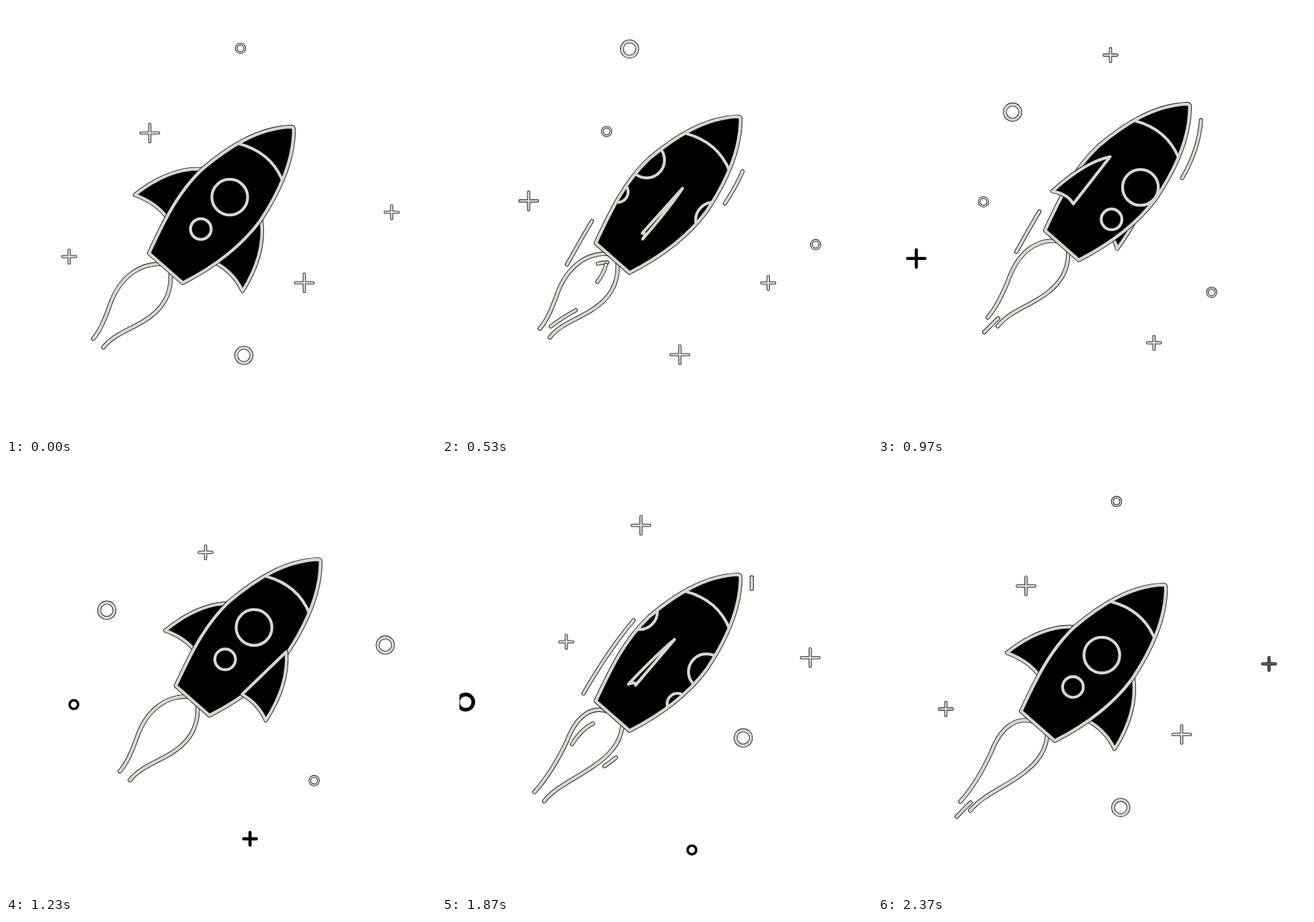
An HTML page for the animation above (2.4 s loop, 640 by 640 pixels).

```html
<!DOCTYPE html>
<html lang="en">
<head>
<meta charset="utf-8">
<title>Rocket</title>
<style>
html, body { margin: 0; width: 100%; height: 100%; overflow: hidden; background: #fff; }
svg { display: block; width: 100%; height: 100%; }
path, circle { fill: none; stroke-linecap: round; stroke-linejoin: round; }
</style>
</head>
<body>
<svg viewBox="0 0 640 640">
  <defs>
    <clipPath id="sky"><rect x="26" y="10" width="589" height="620"/></clipPath>
    <clipPath id="hull"><path id="hullShape"/></clipPath>
  </defs>
  <g id="stars" clip-path="url(#sky)"></g>
  <g id="rocket"></g>
</svg>
<script>
const LOOP = 2400, HALF = LOOP / 2, STEP = 40;
const INK = '#000', GREY = '#d8d7cf';
const BODY = 'M424 180C375 182 331 210 292 243C257 276 236 318 213 368L263 412' +
  'C308 389 350 358 378 320C404 281 428 232 428 184Q428 180 424 180Z';

const $ = id => document.getElementById(id);
const clamp = v => Math.max(0, Math.min(1, v));

function set(el, attrs) {
  for (const k in attrs) el.setAttribute(k, attrs[k]);
}
function add(parent, tag, attrs = {}) {
  const el = document.createElementNS('http://www.w3.org/2000/svg', tag);
  set(el, attrs);
  return parent.appendChild(el);
}
function show(el, on) {
  el.style.display = on ? '' : 'none';
  return on;
}

// A grey line with a thin dark rim: two strokes of the same shape.
function rimmed(parent, tag, attrs, width, fill = 'none') {
  const g = add(parent, 'g');
  const back = add(g, tag, { ...attrs, stroke: INK, 'stroke-width': width + 1.7, style: 'fill:' + fill });
  const front = add(g, tag, { ...attrs, stroke: GREY, 'stroke-width': width });
  return { g, front, set: a => { set(back, a); set(front, a); } };
}

// ---- Stars drift down-left, entering at the top or right edge of the sky.
const SLOPE = 1.19;
const ring = r => rimmed($('stars'), 'circle', { r }, r > 8 ? 3.7 : 2);
const plus = r => rimmed($('stars'), 'path', { d: `M${-r} 0H${r}M0 ${-r}V${r}` }, 2.9);

// x and y at time 0, time of leaving, speed (px/ms) before and after time 0
function star(mark, x, y, end, before, after = before) {
  const birth = Math.max((x - 615) / before, (10 - y) / before / SLOPE);
  return t => {
    if (t >= end) t -= LOOP;
    if (!show(mark.g, t > birth + 50)) return;
    const d = t * (t < 0 ? before : after);
    const light = clamp(Math.min((t - birth - 140) / 60, (end - 400 - t) / 40));
    set(mark.g, { transform: `translate(${x - d} ${y + SLOPE * d})` });
    set(mark.front, { stroke: `rgb(${216 * light},${215 * light},${207 * light})` });
  };
}
const stars = [
  star(ring(6.4), 349, 63, 1600, .15, .2),
  star(ring(6.4), 626.5, 271.5, 2210, .1354),
  star(ring(11.4), 372.5, -47, 1885, .1794),
  star(ring(11.4), 354, 520, 450, .1815, .2),
  star(plus(13), 214, 189, 1150, .158, .1635),
  star(plus(9.5), 94, 373, 450, .175, .1625),
  star(plus(13), 444, 412, 960, .2, .173),
  star(plus(9.5), 574, 307, 1570, .2, .17)
];

// ---- Rocket layers, back to front
const rocket = $('rocket');
set($('hullShape'), { d: BODY });

// Flame edge: seven curve points; a wave of the given size runs along them.
function flame(points, size, crest) {
  const line = rimmed(rocket, 'path', {}, 4.6);
  return sway => {
    const v = points.map(([x, y], i) => {
      const w = sway * size * Math.cos((i - crest) * .62);
      return `${x + w} ${y - w}`;
    });
    line.set({ d: `M${v[0]}C${v.slice(1)}` });
  };
}
const flames = [
  flame([[232, 384], [197, 383], [170, 405], [156, 441], [148, 464], [141, 482], [130, 495]], 15, 2.5),
  flame([[245, 396], [247, 430], [233, 452], [205, 469], [182, 483], [160, 489], [145, 508]], 9, 1)
];

// Dashes that run along a path: the tail follows the head after a lag.
function streaks(d, travel, lag, ...starts) {
  return starts.map(start => {
    const line = rimmed(rocket, 'path', { d, pathLength: 1 }, 4.2);
    return t => {
      const head = clamp((t - start) / travel), tail = clamp((t - start - lag) / travel);
      if (show(line.g, head > tail))
        line.set({ 'stroke-dasharray': `${head - tail} 3`, 'stroke-dashoffset': -tail });
    };
  });
}
const trails = [
  streaks('M384 169C350 175 310 203 275 241C235 287 210 328 170 400', 366, 150, 88, 522, 1570),
  streaks('M230 274C200 293 170 323 134 364', 200, 200, 1280),
  streaks('M445 184C447 228 434 266 405 309', 220, 150, 240, 777, 1365, 1852),
  streaks('M230 397C205 396 180 415 158 472', 200, 80, 40, 494, 1290, 1760),
  streaks('M228 400C222 430 185 455 117 525', 230, 40, 232, 480, 740, 2130),
  streaks('M215 452Q175 470 146 492', 180, 100, 340),
  streaks('M243 452Q225 468 180 490', 180, 90, 1826)
].flat();

const newFin = () => rimmed(rocket, 'path', {}, 4.4, INK);
const backFin = newFin(), sideFin = newFin();

add(rocket, 'path', { d: BODY, stroke: INK, 'stroke-width': 6.3, style: 'fill:' + INK });
const hull = add(rocket, 'g', { 'clip-path': 'url(#hull)', stroke: GREY, 'stroke-width': 4.3 });
const windows = [0, 1].map(() => {
  const g = add(hull, 'g');
  add(g, 'circle', { cx: 333, cy: 284.5, r: 26.6 });
  add(g, 'circle', { cx: 290, cy: 332, r: 15.4 });
  return g;
});
add(hull, 'path', { d: 'M347 205Q395 218 412 261' });
add(rocket, 'path', { d: BODY, stroke: GREY, 'stroke-width': 4.6 });
const frontFin = newFin();

// Fin outline while it turns from the right side (0) to the left side (1)
function finPath(p) {
  const pt = (x, y, dx, dy) => `${x - dx * p} ${y - dy * p}`;
  return `M${pt(380, 320, 88, 77)}Q${pt(386, 370, 142, 130)} ${pt(352, 424, 160, 143)}` +
    `Q${pt(340, 398, 116, 105)} ${pt(314, 383, 74, 68)}Z`;
}

function drawRocket(t) {
  const k = 1 - Math.abs(t - HALF) / HALF;
  const lift = k * k * (3 - 2 * k);
  set(rocket, { transform: `translate(${40 * lift} ${-38 * lift})` });

  // half a turn per half loop; the last step already shows the end pose
  const u = t % HALF, turn = u < HALF - STEP ? u : HALF, p = turn / HALF;
  const side = p < .03 || p > .97;
  backFin.set({ d: finPath(1 - p) });
  (side ? sideFin : frontFin).set({ d: finPath(p) });
  show(sideFin.g, side);
  show(frontFin.g, !side);

  [-turn, HALF - turn].forEach((age, i) => {
    const x = 72 * Math.sin(age * .00128);
    set(windows[i], { transform: `translate(${x} ${x * .9})` });
  });

  const sway = (1 - Math.cos(t * .025)) / 2;
  flames.forEach(f => f(sway));
}

function draw(ms) {
  const t = Math.round((ms % LOOP) / STEP) * STEP % LOOP;
  stars.forEach(s => s(t));
  trails.forEach(s => s(t));
  drawRocket(t);
}

let begin;
function tick(now) {
  begin ??= now;
  draw(now - begin);
  requestAnimationFrame(tick);
}
draw(0);
requestAnimationFrame(tick);
</script>
</body>
</html>
```
